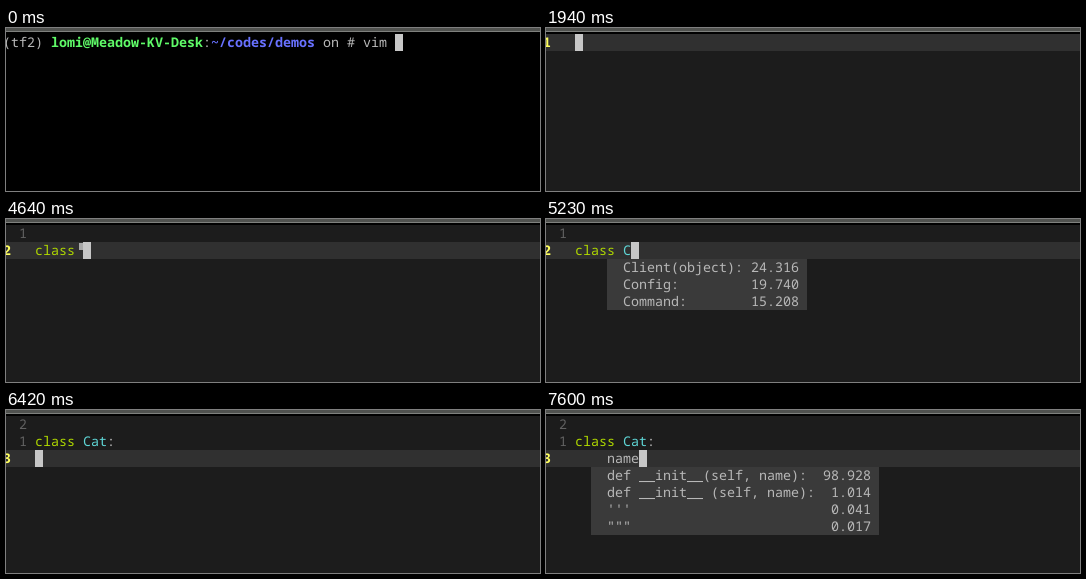
Write an HTML page that moves like this. It is 534 px wide and 163 px high and loops after 8000 ms.

```html
<!DOCTYPE html>
<html lang="en">
<head>
<meta charset="utf-8">
<title>Editor session</title>
<style>
html, body { margin: 0; width: 534px; height: 163px; overflow: hidden; background: #000; }
svg { display: block; }
text { font: 13.3333px "Noto Sans Mono", "DejaVu Sans Mono", monospace; white-space: pre; text-rendering: geometricPrecision; }
.bold { font-weight: 700; }
</style>
</head>
<body>
<svg id="stage" width="534" height="163" viewBox="0 0 534 163"></svg>
<script>
const LOOP = 8000, CELL = 8, ROW = 17, LEFT = -3, TOP = 6;
const INK = "#b8b8b8", LIME = "#afd700", CYAN = "#5fd7d7", YELLOW = "#ffff5f";
const stage = document.getElementById("stage");

const x = col => LEFT + col * CELL;
const y = row => TOP + row * ROW;
const escape = s => s.replace(/&/g, "&amp;").replace(/</g, "&lt;");
const rect = (left, top, w, h, fill) =>
  `<rect x="${left}" y="${top}" width="${w}" height="${h}" fill="${fill}"/>`;
const text = (col, row, s, fill = INK, bold = false) =>
  `<text x="${x(col)}" y="${y(row) + 13}" fill="${fill}"${bold ? ' class="bold"' : ""}>${escape(s)}</text>`;
const cursor = (col, row) => rect(x(col), y(row), CELL, ROW, "#c7c7c7");
const blank = (col, row) => rect(x(col) + 4, y(row) + 1, 4, 7, "#a8a8a8");

const chrome = rect(0, 0, 534, 3, "#50524f") + rect(0, 3, 534, 1, "#7f817e");

function shell(typed, entered = false) {
  return rect(0, 4, 534, 159, "#000") +
    text(0, 0, "(tf2)") + text(6, 0, "lomi@Meadow-KV-Desk", "#5ffa68", true) +
    text(25, 0, ":") + text(26, 0, "~/codes/demos", "#6871ff", true) +
    text(40, 0, "on # vim " + typed) +
    (entered ? cursor(0, 1) : cursor(49 + typed.length, 0));
}

// Suggestions sit two cells left of the word they complete.
function menu(col, row, width, items) {
  return rect(x(col), y(row), width * CELL, items.length * ROW, "#3a3a3a") +
    items.map(([label, score], i) =>
      text(col + 2, row + i, label) +
      text(col + width - 1 - score.length, row + i, score)).join("");
}

function editor(row, col, body = "", popup = "") {
  let out = rect(0, 4, 534, 2, "#000") + rect(0, 6, 534, 157, "#1c1c1c") +
    rect(0, y(row), 534, ROW, "#303030");
  for (let r = 0; r < row; r++) out += text(2, r, String(row - r), "#626262");
  return out + text(0, row, String(row + 1), YELLOW, true) +
    body + popup + cursor(col, row);
}

const keyword = text(4, 1, "class", LIME);
const word = s => editor(1, 4 + s.length, text(4, 1, s));
const named = (name, popup) => editor(1, 10 + name.length,
  keyword + text(10, 1, name.slice(0, 3), CYAN) + text(13, 1, name.slice(3)), popup);
const header = keyword + text(10, 1, "Cat", CYAN) + text(13, 1, ":");
const indent = [4, 5, 6, 7].map(c => blank(c, 2)).join("");
const member = s => editor(2, 8 + s.length, header + text(8, 2, s), initMenu);

const cMenu = menu(8, 2, 25, [
  ["Client(object):", "24.316"], ["Config:", "19.740"], ["Command:", "15.208"]]);
const caMenu = menu(8, 2, 25, [
  ["Camera(object):", "27.154"], ["Category:", "22.860"], ["Cache(object):", "18.493"]]);
const catMenu = menu(8, 2, 27, [
  ["Category:", "33.482"], ["Category(object):", "29.648"],
  ["Catalog:", "20.272"], ["Catch(object):", "16.598"]]);
const initMenu = menu(6, 3, 36, [
  ["def __init__(self, name):", "98.928"], ["def __init__ (self, name):", "1.014"],
  ["'''", "0.041"], ['"""', "0.017"]]);

const steps = [
  [0, shell("")],
  [900, shell("c")],
  [1050, shell("cat")],
  [1200, shell("cat.")],
  [1500, shell("cat.py")],
  [1790, shell("cat.py", true)],
  [1940, editor(0, 4)],
  [3590, editor(1, 4)],
  [3890, word("cl")],
  [4040, word("cla")],
  [4340, word("clas")],
  [4490, editor(1, 9, keyword)],
  [4640, editor(1, 10, keyword + blank(9, 1))],
  [5080, named("C")],
  [5230, named("C", cMenu)],
  [5380, named("Ca", cMenu)],
  [5530, named("Ca", caMenu)],
  [5830, named("Cat", catMenu)],
  [5970, named("Cat:", catMenu)],
  [6120, named("Cat:")],
  [6420, editor(2, 4, header)],
  [6860, editor(2, 8, header + indent)],
  [7010, editor(2, 8, header + indent, initMenu)],
  [7310, member("na")],
  [7460, member("nam")],
  [7600, member("name")]
];

let shown = -1;
function draw(now) {
  const t = now % LOOP;
  let i = steps.length - 1;
  while (steps[i][0] > t) i--;
  if (i !== shown) stage.innerHTML = chrome + steps[shown = i][1];
}
function tick() {
  draw(performance.now());
  requestAnimationFrame(tick);
}
tick();
</script>
</body>
</html>
```
